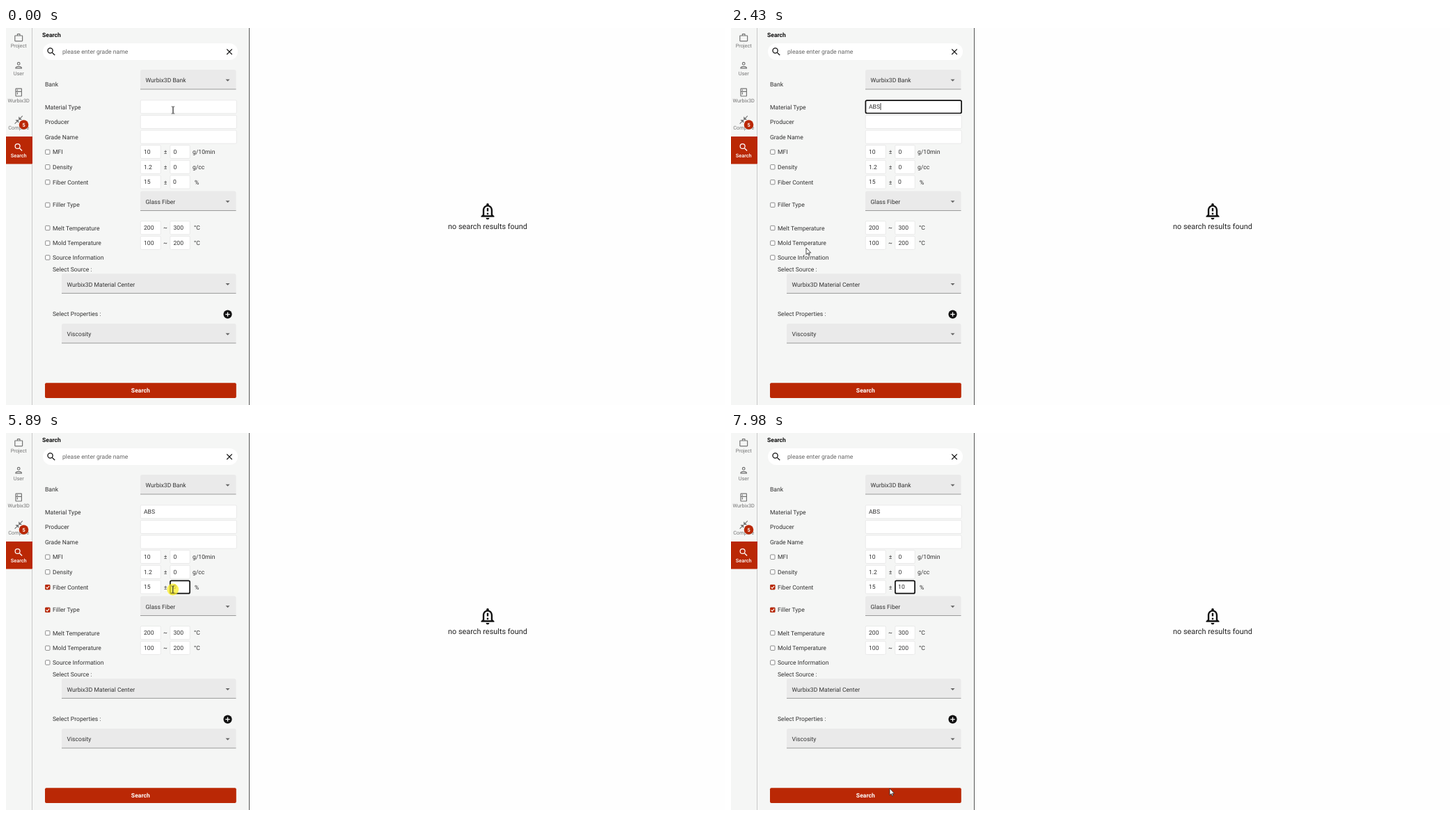
Recreate the animation shown at these times as an HTML page. Size 1033 px wide and 542 px high, loop 8000 ms.

```html
<!DOCTYPE html>
<html lang="en">
<head>
<meta charset="utf-8">
<title>Material search</title>
<style>
  html, body { margin: 0; width: 100%; height: 100%; overflow: hidden; background: #fefefe; }
  svg { display: block; width: 1033px; height: 542px; }
  text { font: 8.6px Roboto, sans-serif; fill: #333; text-rendering: geometricPrecision; white-space: pre; }
  .bold { font-weight: 700; }
  .medium { font-weight: 500; }
  .small { font-size: 7.35px; }
  .middle { text-anchor: middle; }
</style>
</head>
<body>
<svg viewBox="0 0 1033 542"><g id="page"></g><g id="live"></g></svg>
<script>
const RED = '#ba2805', PANEL = '#f5f6f5', LOOP = 8000;

// Icons on a 24 unit grid
const ICONS = {
  work: 'M14 6V4h-4v2h4zM4 8v11h16V8H4zm16-2c1.11 0 2 .89 2 2v11c0 1.11-.89 2-2 2H4c-1.11 0-2-.89-2-2V8c0-1.11.89-2 2-2h4V4c0-1.11.89-2 2-2h4c1.11 0 2 .89 2 2v2h4z',
  person: 'M12 6a2 2 0 1 1 0 4 2 2 0 0 1 0-4zm0 10c2.7 0 5.8 1.29 6 2H6c.23-.72 3.31-2 6-2zm0-12a4 4 0 1 0 0 8 4 4 0 0 0 0-8zm0 10c-2.67 0-8 1.34-8 4v2h16v-2c0-2.66-5.33-4-8-4z',
  cabinet: 'M18 2H6a2 2 0 0 0-2 2v16c0 1.1.9 2 2 2h12c1.1 0 2-.9 2-2V4c0-1.1-.9-2-2-2zM18 20H6v-9h12V20zm0-11H6V4h12v5zM8 5h2v3H8zm0 7h2v5H8z',
  compress: 'M22 3.41L16.71 8.7 20 12h-8V4l3.29 3.29L20.59 2zM3.41 22l5.29-5.29L12 20v-8H4l3.29 3.29L2 20.59z',
  search: 'M15.5 14h-.79l-.28-.27A6.47 6.47 0 0 0 16 9.5 6.5 6.5 0 1 0 9.5 16c1.61 0 3.09-.59 4.23-1.57l.27.28v.79l5 4.99L20.49 19zm-6 0a4.5 4.5 0 1 1 0-9 4.5 4.5 0 0 1 0 9z',
  close: 'M19 6.41L17.59 5 12 10.59 6.41 5 5 6.41 10.59 12 5 17.59 6.41 19 12 13.41 17.59 19 19 17.59 13.41 12z',
  bell: 'M12 22c1.1 0 2-.9 2-2h-4c0 1.1.89 2 2 2zm6-6v-5c0-3.07-1.63-5.64-4.5-6.32V4c0-.83-.67-1.5-1.5-1.5s-1.5.67-1.5 1.5v.68C7.64 5.36 6 7.92 6 11v5l-2 2v1h16v-1l-2-2zm-2 1H8v-6c0-2.48 1.51-4.5 4-4.5s4 2.02 4 4.5v6zM11 8h2v4h-2zm0 6h2v2h-2z'
};

const rect = (x, y, w, h, fill, extra = '') =>
  `<rect x="${x}" y="${y}" width="${w}" height="${h}" fill="${fill}" ${extra}/>`;
const text = (x, middleY, value, cls = '', style = '') =>
  `<text x="${x}" y="${middleY + 3}" class="${cls}" style="${style}">${value}</text>`;
const icon = (name, x, y, scale, fill) =>
  `<path d="${ICONS[name]}" fill="${fill}" fill-rule="evenodd" transform="translate(${x} ${y}) scale(${scale}) translate(-12 -12)"/>`;

const inputs = [];
function input(x, y, w, value = '') {
  inputs.push({ x, y: y - 9.5, w, h: 19 });
  return rect(x + .25, y - 9.5, w - .5, 19, '#fff', 'rx="1.5" stroke="#e3e3e3" stroke-width=".7"') +
    text(x + 5, y - .2, value);
}
const range = (y, low, sign, high, unitX, unit) =>
  input(193, y, 29.5, low) + text(229, y, sign, 'middle') +
  input(235.5, y, 29, high) + text(unitX, y, unit);

const select = (x, y, value) =>
  `<path d="M${x} ${y + 28}v-25.500q0-2.500 2.500-2.500H328q2.500 0 2.500 2.500v25.500z" fill="#eaeaea"/>` +
  rect(x, y + 27.600, 330.5 - x, .8, '#858585') + text(x + 7.5, y + 15.200, value) +
  `<path d="M315.500 ${y + 13.700}h6l-3 3z" fill="#666"/>`;

const checkbox = (y, checked) => checked
  ? rect(56.2, y - 3.6, 7.2, 7.2, RED, 'rx="1"') +
    `<path d="M57.600 ${y}l1.600 1.700 2.900-3.500" fill="none" stroke="#fff" stroke-width="1.100"/>`
  : rect(56.6, y - 3.2, 6.4, 6.4, '#fff', 'rx="1" stroke="#707070" stroke-width=".8"');
const option = (y, label) => checkbox(y) + text(67, y, label);

function sidebar() {
  const tab = (y, name, label) =>
    icon(name, 18.2, y, .6, '#757575') + text(18.2, y + 11.2, label, 'small middle', 'fill:#757575');
  return rect(0, 0, 38, 542, PANEL) +
    tab(14, 'work', 'Project') + tab(53.6, 'person', 'User') +
    tab(92.6, 'cabinet', 'Wurbix3D') + tab(132, 'compress', 'Compare') +
    `<circle cx="25.500" cy="139" r="6.800" fill="${RED}"/>` +
    text(25.5, 138.8, '5', 'small bold middle', 'fill:#fff') +
    rect(0, 156, 38, 39.5, RED) + icon('search', 18.2, 171.6, .63, '#fff') +
    text(18.2, 182.8, 'Search', 'small medium middle', 'fill:#fff');
}

function form() {
  return rect(38, 0, 311.5, 542, PANEL) + rect(37, 0, 1, 156, '#c9c9c9') +
    rect(37, 195.5, 1, 346.5, '#c9c9c9') + rect(349, 0, 1, 542, '#555') +
    text(52, 10, 'Search', 'bold', 'fill:#111') +
    rect(53, 22, 280, 24, '#fff', 'rx="12"') + icon('search', 65.2, 34.1, .65, '#111') +
    text(81, 33.5, 'please enter grade name', '', 'fill:#666') + icon('close', 321, 34.2, .6, '#111') +
    text(56, 80.5, 'Bank') + select(193, 60, 'Wurbix3D Bank') +
    text(56, 113.5, 'Material Type') + input(193, 113.3, 138.5) +
    text(56, 135, 'Producer') + input(193, 135, 138.5) +
    text(56, 156.7, 'Grade Name') + input(193, 156.6, 138.5) +
    option(178.2, 'MFI') + range(178, '10', '±', '0', 268, 'g/10min') +
    option(199.8, 'Density') + range(199.8, '1.2', '±', '0', 268, 'g/cc') +
    option(221.6, 'Fiber Content') + range(221.5, '15', '±', '', 271, '%') +
    option(254.4, 'Filler Type') + select(193, 234.6, 'Glass Fiber') +
    option(287.5, 'Melt Temperature') + range(287.2, '200', '~', '300', 270, '°C') +
    option(309.2, 'Mold Temperature') + range(308.9, '100', '~', '200', 270, '°C') +
    option(330, 'Source Information') +
    text(67, 346.5, 'Select Source :') + select(80, 353.3, 'Wurbix3D Material Center') +
    text(67, 410.7, 'Select Properties :') + select(80, 425, 'Viscosity') +
    '<circle cx="318.500" cy="411.600" r="6.100" fill="#111"/>' +
    '<path d="M315.300 411.600h6.400m-3.200-3.200v6.400" stroke="#fff" stroke-width="1.300"/>' +
    rect(56, 510.3, 274.8, 21.7, RED, 'rx="2"') +
    text(193.3, 521, 'Search', 'bold middle', 'fill:#fff');
}

const results = icon('bell', 692, 263.4, 1.19, '#111') +
  text(692, 286.2, 'no search results found', 'middle', 'font-size:10.9px;fill:#222');

document.getElementById('page').innerHTML = sidebar() + form() + results;

// Pointer moves: start, end, steps, x, y, easing power
const moves = [
  [470, 670, 4, 232, 133],
  [1460, 2220, 12, 147, 325],
  [2290, 2430, 3, 108, 316],
  [2500, 3050, 9, 58, 258],
  [3120, 3660, 9, 62, 254],
  [4260, 4820, 9, 55.5, 219.5],
  [5160, 5630, 7, 244, 225],
  [5890, 6160, 4, 227, 225],
  [7090, 7980, 13, 228, 511, 1.6]
];
const presses = [[70, 140], [3990, 4060], [5020, 5090], [5890, 6160]];
const materialKeys = [540, 670, 870], toleranceKeys = [6690, 6890];

function pointerAt(t) {
  let x = 240, y = 118;
  for (const [start, end, steps, toX, toY, power = 1] of moves) {
    if (t < start) break;
    const step = Math.floor((t - start) / (end - start) * (steps - 1) + .01) + 1;
    const p = Math.min(1, step / steps) ** power;
    x += (toX - x) * p;
    y += (toY - y) * p;
  }
  return { x, y };
}

function pointer({ x, y }) {
  const overInput = inputs.some(b => x > b.x && x < b.x + b.w && y > b.y && y < b.y + b.h);
  const shape = overInput
    ? '<path d="M-2.300-5h1.600q.7 0 .7.700v8.600q0 .7-.7.700h-1.600M2.300-5H.7Q0-5 0-4.300v8.600Q0 5 .7 5h1.600" fill="none" stroke="#333" stroke-width=".8"/>'
    : '<path d="M0 0v9.600l2.200-2 1.500 3.400 1.500-.6-1.500-3.200h3z" fill="#fff" stroke="#222" stroke-width=".8"/>';
  return `<g transform="translate(${x} ${y})">${shape}</g>`;
}

const typed = (t, word, keys) => word.slice(0, keys.filter(k => t >= k).length);
const focusRing = (x, y, w) =>
  rect(x + .4, y - 9.2, w - .8, 18.4, 'none', 'rx="2" stroke="#111" stroke-width="1.7"');
const caret = (t, since, x, y) =>
  (t - since) % 1060 < 530 ? rect(x, y - 5, .8, 10, '#111') : '';

function draw(t) {
  const at = pointerAt(t);
  const material = typed(t, 'ABS', materialKeys);
  const tolerance = typed(t, '10', toleranceKeys);
  const selected = t >= 6020 && !tolerance;
  let out = text(198, 113.1, material);

  if (t >= 70 && t < 3990) {
    const since = t < 540 ? 70 : t < 930 ? 540 : 930;
    out += focusRing(193, 113.3, 138.5) + caret(t, since, 198 + [0, 5.7, 11.1, 16.6][material.length], 113);
  }
  if (selected) out += rect(239.5, 216.3, 5.6, 10.6, '#1a73d9');
  out += text(240.1, 221.3, tolerance || '0', '', selected ? 'fill:#fff' : '');
  if (t >= 5890) {
    out += focusRing(235.5, 221.5, 29);
    if (tolerance) out += caret(t, t < 6930 ? 6690 : 6930, 240.5 + tolerance.length * 4.85, 221.5);
  }
  if (t >= 4060) out += checkbox(254.4, true);
  if (t >= 5090) out += checkbox(221.6, true);
  if (presses.some(([down, up]) => t >= down && t < up))
    out += `<circle cx="${at.x}" cy="${at.y}" r="8.400" fill="#fbed25" opacity=".75"/>`;
  document.getElementById('live').innerHTML = out + pointer(at);
}

const begin = performance.now();
function tick() {
  draw((performance.now() - begin) % LOOP);
  requestAnimationFrame(tick);
}
tick();
</script>
</body>
</html>
```
